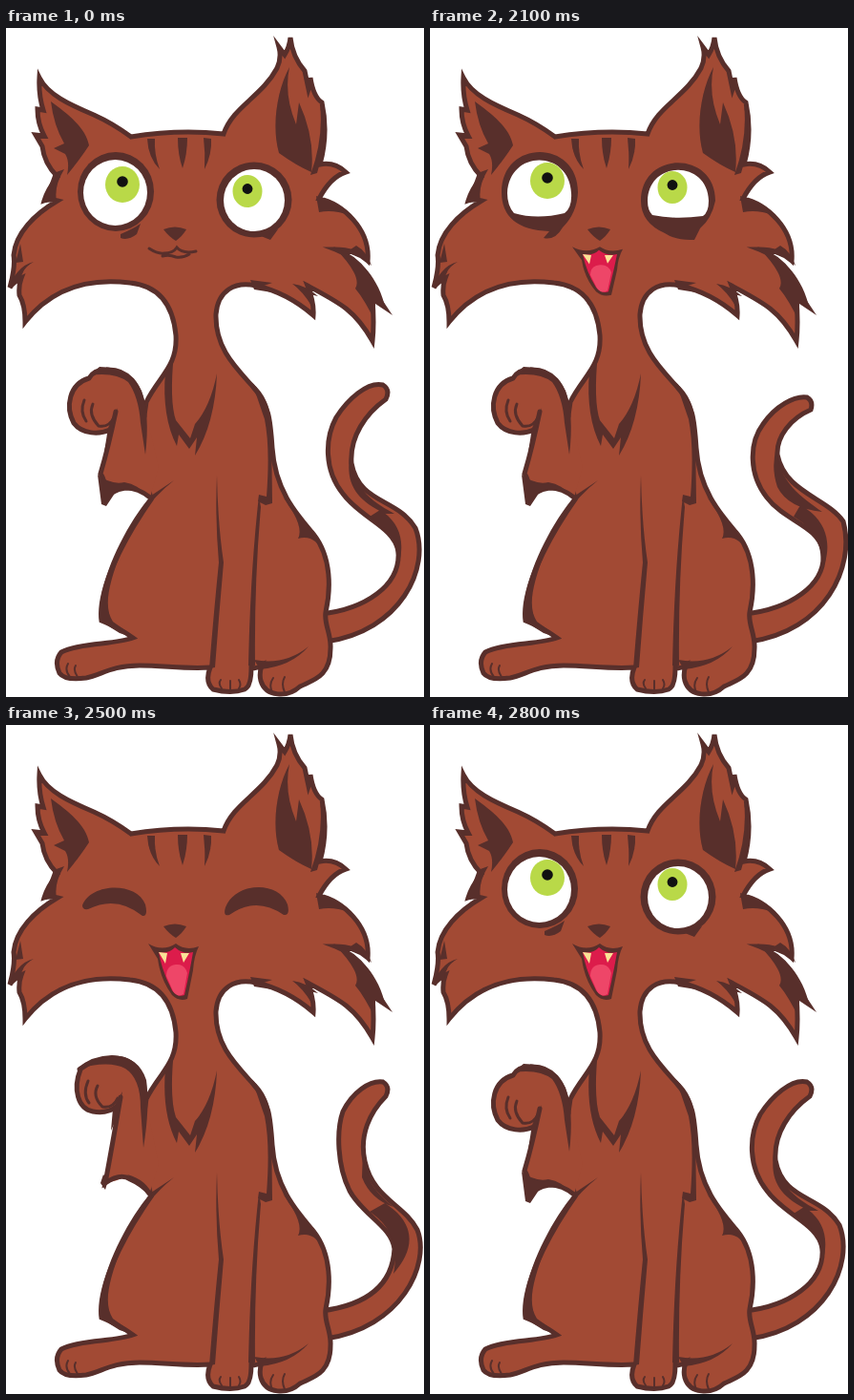
Animation, 438 px wide and 701 px high, one loop 3.1 s. Source, as an HTML page:

```html
<!DOCTYPE html>
<html lang="en">
<head>
<meta charset="utf-8">
<title>Laughing cat</title>
<style>
html, body { margin: 0; width: 100%; height: 100%; overflow: hidden; background: #fff; }
svg { display: block; width: 100vw; height: 100vh; }
.fur { fill: #a24a34; stroke: #582f2b; stroke-width: 5; stroke-miterlimit: 6; }
.dark { fill: #582f2b; }
.line { fill: none; stroke: #582f2b; stroke-width: 3; stroke-linecap: round; }
.white { fill: #fff; }
.iris { fill: #b9d948; }
.pupil { fill: #111; }
.red { fill: #dc1c4b; }
.tongue { fill: #ee4668; }
.tooth { fill: #fae296; }
[data-part] { display: none; }
</style>
</head>
<body>
<svg viewBox="0 0 438 701">
  <!-- tails -->
  <g data-part="tail-rest">
    <path class="fur" d="M330 614C375 609 414 585 411 548C406 522 372 514 353 488C333 463 334 430 346 408C358 389 379 370 395 374Q403 379 398 389C377 404 360 428 362 456C370 499 410 492 429 524C445 565 414 632 335 643Z"/>
    <path class="dark" d="M361 445C362 486 390 499 407 509L398 509C364 494 355 474 361 445ZM392 505C416 520 420 545 407 574C414 546 405 526 381 512Z"/>
  </g>
  <g data-part="tail-low">
    <path class="fur" d="M330 614C375 609 416 585 412 548C406 521 372 517 353 492C334 468 334 435 349 415C362 396 382 385 395 387Q402 391 399 400C378 409 363 428 364 447C372 487 416 492 433 517C446 565 414 632 335 643Z"/>
    <path class="dark" d="M363 440C365 476 390 492 411 507Q375 503 364 481Q357 460 363 440ZM388 500C417 515 424 545 408 574C414 546 405 526 381 512Z"/>
  </g>
  <g data-part="tail-high">
    <path class="fur" d="M330 614C378 608 405 587 407 549C404 525 374 514 360 488C347 462 346 425 353 405C363 385 381 372 395 374Q403 379 398 389C381 406 370 430 376 457C385 497 417 502 431 529C445 565 414 632 335 643Z"/>
    <path class="dark" d="M374 445C375 478 390 492 406 505Q382 497 373 474ZM397 501C430 522 429 549 406 575C413 540 398 521 381 510Z"/>
  </g>

  <!-- head and body -->
  <path class="fur" d="M35 52C44 70 66 80 92 91Q112 100 131 114Q180 106 228 111C238 82 268 72 284 42Q289 31 286 20L292 28Q297 20 298 10Q300 30 313 45L317 64Q319 58 319 52Q322 72 331 78Q338 110 329 143Q344 140 356 151Q340 156 328 179C352 184 382 210 379 244Q366 232 345 232C376 244 384 268 388 280L396 292L384 284Q386 310 384 328C366 296 350 288 316 270Q323 288 322 301C300 282 280 274 262 270C240 265 222 275 220 300C219 335 240 355 258 375C276 395 277 410 279 440C282 485 305 510 322 530C342 555 340 590 335 612C333 625 341 635 340 650C340 680 322 683 308 690C295 702 272 701 267 684Q265 677 268 668Q262 672 257 670Q257 690 250 693Q236 698 217 693Q208 685 214 670C190 672 165 668 140 668C110 668 100 678 84 681Q62 684 56 676Q50 663 58 654Q70 648 100 645Q125 642 133 639Q118 628 100 621C96 590 120 540 152 494L140 440L147 392C160 365 180 355 178 322C175 290 160 270 130 267C90 262 50 270 20 308Q20 290 14 280Q13 270 16 262Q8 266 4 272Q10 250 8 238C10 215 30 195 54 181Q46 179 40 181Q43 170 54 156Q40 142 38 124L31 112L40 113Q33 100 33 85L39 86Q34 70 35 52Z"/>

  <!-- ears, brow and cheeks -->
  <path class="dark" d="M47 77C65 90 84 105 87 123Q78 137 64 154Q67 140 62 132L50 126L61 121Q50 102 47 77ZM297 41C284 65 278 103 286 131Q304 144 320 151Q324 115 307 78L304 101Q291 70 297 41ZM329 80Q338 115 326 152L319 154Q333 116 329 80Z"/>
  <path class="dark" d="M148 116L156 116Q155 132 161 148Q149 136 148 116ZM180 115L190 115Q190 132 185 147Q180 133 180 115ZM207 115L215 116Q216 132 208 148Q209 131 207 115Z"/>
  <path class="dark" d="M343 229Q374 260 366 273Q376 285 387 308L387 286L398 295C390 260 370 240 343 229ZM367 228Q378 234 383 249Q373 237 355 236ZM325 176Q345 182 359 196Q343 190 328 193ZM50 152L61 148Q50 166 53 181L39 182ZM3 270Q14 248 29 245Q16 252 15 266ZM10 246L15 226L18 245ZM300 268Q315 270 327 281L318 279L320 291Q311 276 300 268ZM256 264L279 267L270 270L291 279L260 274Z"/>

  <!-- chest, legs and haunches -->
  <path class="dark" d="M176 340Q171 391 178 411L193 430L198 415Q214 397 221 362Q219 414 198 448L200 429L192 441L181 426L179 438Q163 407 167 360Z"/>
  <path class="dark" d="M258 372Q278 388 278 420L279 498L272 500L264 496L265 489L273 491Q277 440 271 410ZM290 491Q321 525 333 551Q324 530 306 535Q313 522 290 491ZM176 474Q142 501 123 543C105 587 103 608 112 622L137 640L119 634L98 621C95 580 126 520 152 490ZM221 469Q222 520 228 560Q223 616 219 670L213 671Q218 609 223 560Q219 515 221 469ZM265 490L267 502Q260 583 261 668L254 668Q256 570 265 490ZM260 662Q293 668 317 648Q299 669 266 672Z"/>
  <path class="line" style="stroke-width:2" d="M67 680Q61 673 65 666M75 680Q70 673 73 668M226 692Q222 687 225 683M235 693L235 684M244 692Q247 688 244 683M279 696Q275 688 280 681M292 696Q288 687 292 680"/>

  <!-- raised paw -->
  <g data-part="paw-low">
    <path class="fur" stroke="none" d="M147 405C143 372 127 357 105 358Q92 358 87 367C66 373 62 397 71 414C80 426 98 426 112 420L99 467Q105 475 103 498Q109 484 125 482Q139 482 151 492L160 460Z" style="stroke:none"/>
    <path class="line" style="stroke-width:5" d="M145 407C142 372 127 357 105 358Q92 358 87 367C66 373 62 397 71 414C80 426 98 426 109 421M115 402Q107 440 99 467Q105 475 104 496Q109 484 125 482Q139 482 151 492"/>
    <path class="dark" d="M87 364Q114 360 128 371Q139 386 141 414L146 447Q151 405 142 380Q130 355 98 355ZM117 398Q112 425 103 444L107 419ZM96 468Q110 479 124 476Q139 478 147 491Q130 478 115 486L105 501L100 499Z"/>
    <path class="line" d="M84 412Q77 402 82 390M97 417Q86 405 91 394M97 417Q108 419 113 408"/>
  </g>
  <g data-part="paw-high">
    <path class="fur" style="stroke:none" d="M147 397Q147 348 112 349Q91 350 77 361C70 381 75 402 91 405Q106 408 118 397L104 476Q107 482 123 474Q140 479 150 492L160 460Z"/>
    <path class="line" style="stroke-width:5" d="M145 397Q146 348 112 349Q91 350 77 361M78 361C70 381 75 402 91 405Q106 408 117 399M120 390Q112 437 104 480Q120 469 130 476Q144 482 151 492"/>
    <path class="dark" d="M74 360Q109 351 125 360Q141 370 141 401L144 443Q151 400 147 372Q139 347 111 346Q91 346 74 360ZM122 384Q118 410 110 425L112 402ZM102 471L107 477L104 487L99 480ZM127 471Q147 476 155 495Q140 486 127 471Z"/>
    <path class="line" d="M87 396Q80 387 86 373M101 400Q90 389 96 378M101 400Q112 402 117 391"/>
  </g>

  <!-- eyes -->
  <g data-part="eyes-open">
    <path class="dark" d="M120 216Q134 210 141 205L137 216Q128 223 120 220ZM262 216L285 211L277 222Z"/>
    <ellipse class="dark" cx="115" cy="171.500" rx="40" ry="41.500"/>
    <ellipse class="dark" cx="260" cy="180" rx="39.500" ry="39.500"/>
    <ellipse class="white" cx="114.500" cy="172.500" rx="33.500" ry="34.500"/>
    <ellipse class="white" cx="260" cy="180.500" rx="32" ry="32.500"/>
  </g>
  <g data-part="eyes-half">
    <path class="dark" d="M75 172C75 116 155 116 155 172Q154 194 139 209Q131 223 119 220L125 213Q75 211 75 172ZM221 181C221 128 299 128 299 181Q295 200 283 210L277 222Q258 223 246 215Q221 204 221 181Z"/>
    <path class="white" d="M81 173C83 127 146 127 148 173Q149 188 141 194Q112 201 88 194Q81 186 81 173ZM228 181C229 138 291 138 292 181Q292 193 286 197Q257 201 233 196Q228 191 228 181Z"/>
  </g>
  <g data-part="gaze">
    <ellipse class="iris" cx="122" cy="164" rx="18" ry="19"/>
    <circle class="pupil" cx="122" cy="161" r="5.800"/>
    <ellipse class="iris" cx="253" cy="171" rx="15.500" ry="17"/>
    <circle class="pupil" cx="253" cy="168.500" r="5.400"/>
  </g>
  <path data-part="eyes-closed" class="dark" d="M80 189C89 165 137 164 146 188Q149 201 143 200Q116 178 86 193Q80 194 80 189ZM230 191C241 164 286 163 295 188Q298 200 291 199Q262 179 234 199Q227 201 230 191Z"/>

  <!-- nose and mouth -->
  <path class="dark" d="M165 211Q177 206 189 211Q185 218 178 223Q171 219 165 211Z"/>
  <path data-part="smile" class="line" d="M150 231Q159 237 166 236Q175 236 179 230Q185 237 199 234M164 239Q171 237 178 240Q186 241 192 237"/>
  <g data-part="mouth">
    <path class="dark" d="M149 229Q164 238 178 229Q188 237 202 232Q197 242 196 257L190 287Q181 290 174 283Q162 267 159 245Z"/>
    <path class="red" d="M160 238Q171 240 177 233Q186 241 196 238Q192 261 187 283Q180 286 174 278Q164 260 160 238Z"/>
    <path class="tongue" d="M168 263Q168 252 178 251Q187 250 190 260L186 282Q180 286 175 279Z"/>
    <path class="tooth" d="M160 238L169 239L167 250ZM183 239L192 239L186 249Z"/>
  </g>
</svg>
<script>
const CYCLE = 3100;
const POSES = {
  calm: "tail-rest paw-low eyes-open gaze smile",
  open: "tail-rest paw-low eyes-open gaze mouth",
  half: "tail-low paw-low eyes-half gaze mouth",
  laugh: "tail-high paw-high eyes-closed mouth",
  bob: "tail-low paw-low eyes-closed mouth"
};
const STEPS = [
  [0, "calm"], [2000, "open"], [2100, "half"], [2200, "laugh"],
  [2300, "bob"], [2500, "laugh"], [2700, "half"], [2800, "open"]
];
const parts = [...document.querySelectorAll("[data-part]")];
const part = name => parts.find(el => el.dataset.part === name);
const gaze = part("gaze"), mouth = part("mouth");
let shown;

function show(pose) {
  if (pose === shown) return;
  shown = pose;
  const visible = POSES[pose].split(" ");
  for (const el of parts) el.style.display = visible.includes(el.dataset.part) ? "inline" : "none";
  gaze.setAttribute("transform", pose === "calm" ? "" : "translate(1 -4)");
  // The jaw closes slightly while the eyelids move.
  mouth.setAttribute("transform", pose === "half" ? "translate(0 30) scale(1 .87)" : "");
}

const start = performance.now();
function draw(now) {
  const t = Math.max(0, now - start) % CYCLE;
  show(STEPS.findLast(([at]) => at <= t)[1]);
  requestAnimationFrame(draw);
}
draw(start);
</script>
</body>
</html>
```
